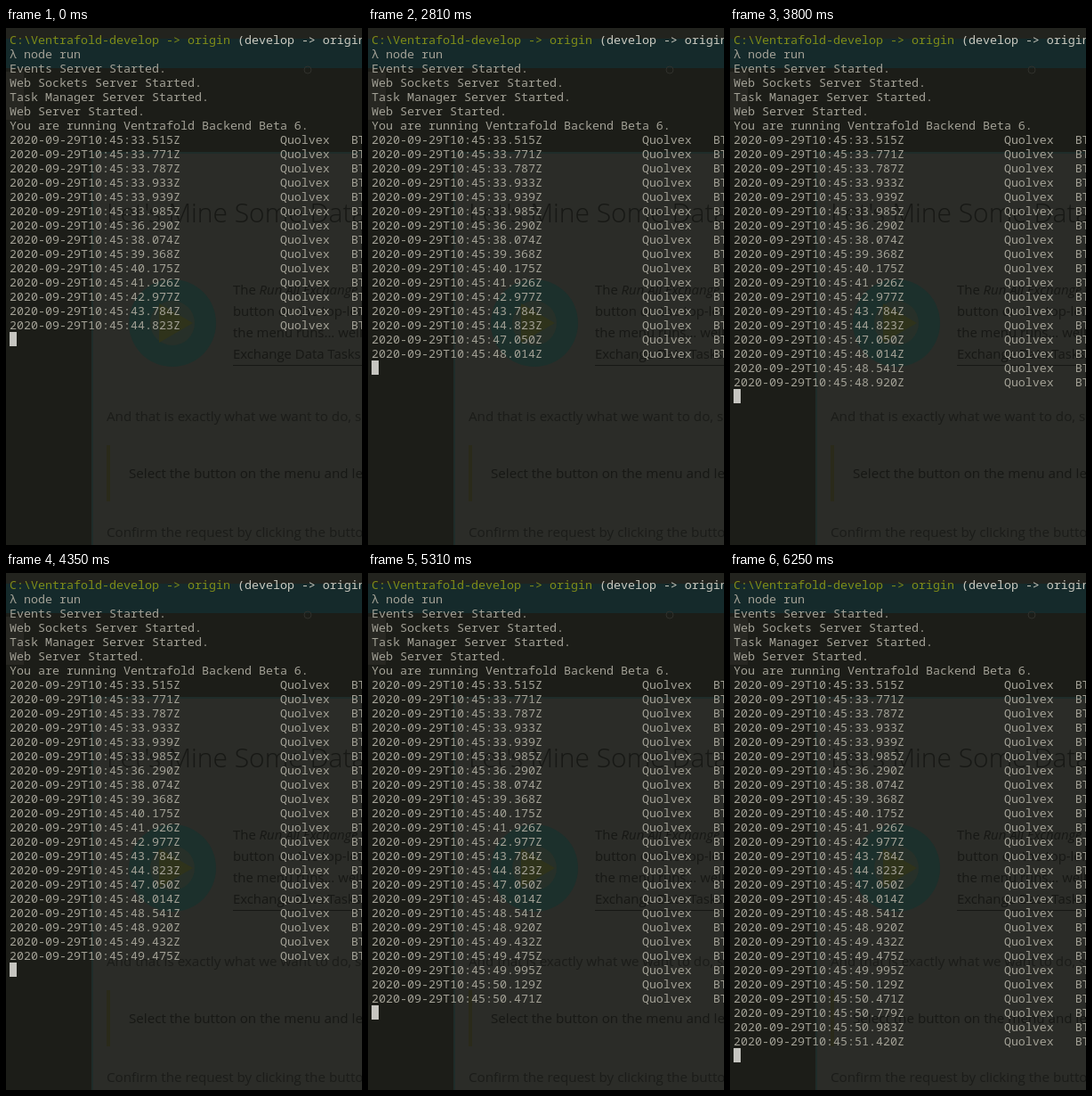
Write an HTML page that moves like this. It is 400 px wide and 580 px high and loops after 6.35 s.

```html
<!DOCTYPE html>
<html lang="en">
<head>
<meta charset="utf-8">
<title>Terminal log</title>
<style>
  html, body { margin: 0; width: 100%; height: 100%; overflow: hidden; background: #1c1d18; }
  #stage { position: relative; width: 400px; height: 580px; overflow: hidden; background: #1c1d18; }
  svg { position: absolute; left: 0; top: 0; }
  svg text { font-family: "Open Sans", "Noto Sans", sans-serif; font-size: 15.2px; fill: #171815; }
  svg .dim { fill: #1b1c19; }
  svg .head { font-size: 30px; font-weight: 300; }
  svg .note { font-size: 14.9px; }
  #log {
    position: absolute; left: 4px; top: 5px; margin: 0;
    font: 13.3333px/16px "Noto Sans Mono", "DejaVu Sans Mono", monospace;
    color: #a3a196; white-space: pre;
  }
  #log div { height: 16px; }
  #log .path { color: #808c18; }
  #log .branch { color: #cbcac0; }
  #cursor { position: absolute; left: 4px; top: 0; width: 8px; height: 16px; background: #c6c5c0; }
</style>
</head>
<body>
<div id="stage">
  <svg width="400" height="580" viewBox="0 0 400 580">
    <rect width="400" height="12" fill="#22231e"/>
    <rect y="12" width="400" height="33" fill="#152a2b"/>
    <rect y="49" width="20" height="54" fill="#272722"/>
    <circle cx="339" cy="47" r="4" fill="none" stroke="#30312c"/>
    <rect x="97" y="140" width="310" height="450" fill="#2b2c28" stroke="#1f2c29" stroke-width="2"/>
    <text class="head" x="113" y="218">Let's Mine Some Data</text>
    <circle cx="187" cy="331" r="49" fill="#1c302c"/>
    <circle cx="187" cy="331" r="25" fill="#273029"/>
    <path d="M172 309L210 331L172 353Z" fill="#2f331b"/>
    <g>
      <text class="note" x="255" y="299">The <tspan font-style="italic">Run All Exchange Data</tspan></text>
      <text class="note" x="255" y="323">button on the top-left of</text>
      <text class="note" x="255" y="347">the menu runs... well, all</text>
      <text class="note" x="255" y="371">Exchange Data Tasks</text>
      <rect x="255" y="378" width="145" height="1" fill="#171815"/>
    </g>
    <text class="dim" x="113" y="441">And that is exactly what we want to do, so</text>
    <rect x="113" y="468" width="4" height="63" fill="#2a2a1a"/>
    <text x="138" y="505">Select the button on the menu and left</text>
    <text class="dim" x="113" y="571">Confirm the request by clicking the button</text>
  </svg>
  <div id="log"></div>
  <div id="cursor"></div>
</div>
<script>
const LOOP = 6350, ROW = 16, TOP = 5;

const intro = [
  '<span class="path">C:\\Ventrafold-develop -&gt; origin</span> <span class="branch">(develop -&gt; origin</span>',
  'λ node run',
  'Events Server Started.',
  'Web Sockets Server Started.',
  'Task Manager Server Started.',
  'Web Server Started.',
  'You are running Ventrafold Backend Beta 6.'
];

const stamps = ('33.515 33.771 33.787 33.933 33.939 33.985 36.290 38.074 39.368 ' +
  '40.175 41.926 42.977 43.784 44.823 47.050 48.014 48.541 48.920 49.432 ' +
  '49.475 49.995 50.129 50.471 50.779 50.983 51.420').split(' ');

// [start ms, log entries shown]
const steps = [
  [0, 14], [2230, 15], [2810, 16], [3240, 17], [3800, 18],
  [4350, 20], [4760, 21], [5310, 23], [5860, 25], [6250, 26]
];

const log = document.getElementById('log');
const cursor = document.getElementById('cursor');

const entry = s => `2020-09-29T10:45:${s}Z`.padEnd(38) + 'Quolvex'.padEnd(10) + 'BT';
log.innerHTML = [...intro, ...stamps.map(entry)].map(t => `<div>${t}</div>`).join('');
const rows = [...log.children];

let shown = -1;
function draw(now) {
  const t = now % LOOP;
  const count = intro.length + steps.findLast(s => s[0] <= t)[1];
  if (count !== shown) {
    shown = count;
    rows.forEach((row, i) => row.style.visibility = i < count ? 'visible' : 'hidden');
    cursor.style.top = TOP + count * ROW + 'px';
  }
}

const start = performance.now();
function tick() {
  draw(performance.now() - start);
  requestAnimationFrame(tick);
}
tick();
</script>
</body>
</html>
```
